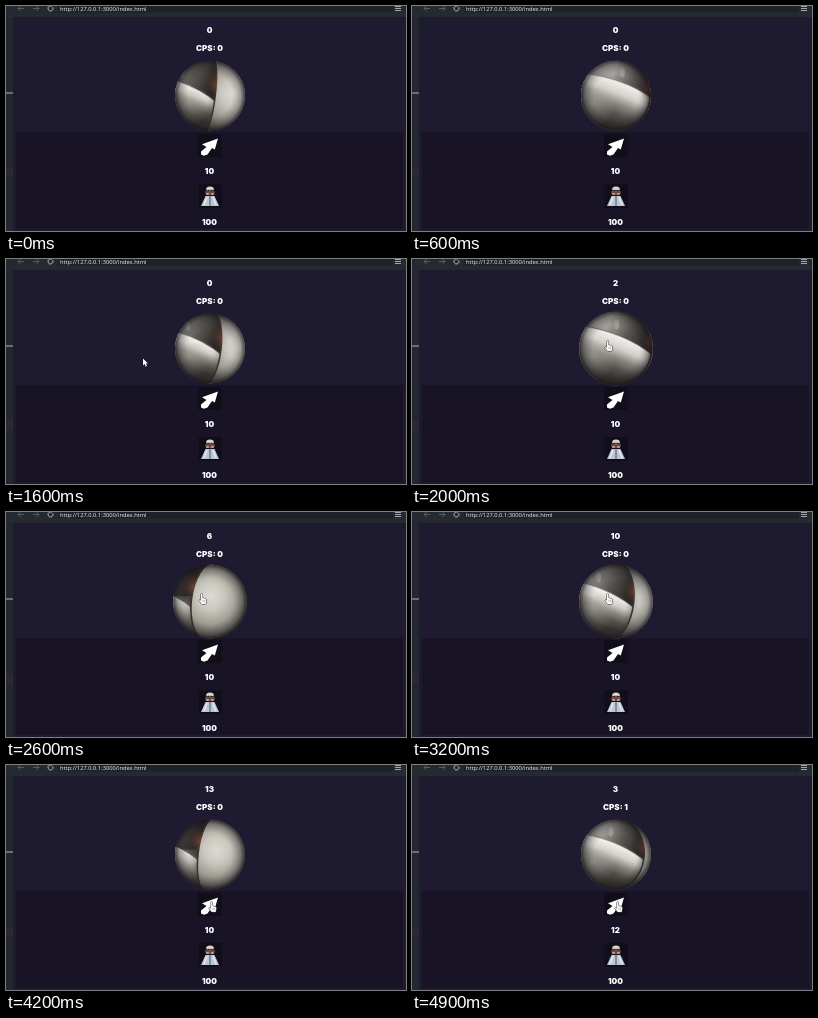
An HTML page with a canvas for the animation above (5 s loop, 400 by 225 pixels).

```html
<!DOCTYPE html>
<html lang="en">
<head>
<meta charset="utf-8">
<title>Clicker</title>
<style>
html, body { margin: 0; width: 100%; height: 100%; overflow: hidden; background: #1e1a2f; }
canvas { display: block; width: 400px; height: 225px; }
</style>
</head>
<body>
<canvas id="stage"></canvas>
<script>
const LOOP = 5000, STEP = 100, SPIN = 1500, R = 35;
const FIRST_CLICK = 1690, CLICK_GAP = 146, CLICKS = 13, PRICE = 10, BUY = 4500;
const path = [
  { t: 900, x: 313, y: 150 },
  { t: 1200, x: 79, y: 117 },
  { t: 1400, x: 79, y: 117 },
  { t: 1800, x: 195, y: 82 },
  { t: 3500, x: 195, y: 82 },
  { t: 3800, x: 205, y: 137 }
];

const canvas = document.getElementById('stage');
const ctx = canvas.getContext('2d');
const dpr = window.devicePixelRatio || 1;
canvas.width = 400 * dpr;
canvas.height = 225 * dpr;

const clamp = (v, lo, hi) => Math.max(lo, Math.min(hi, v));
const ramp = (t, from, to) => clamp((t - from) / (to - from), 0, 1);
const smooth = u => u * u * (3 - 2 * u);

function rect(x, y, w, h, color) {
  ctx.fillStyle = color;
  ctx.fillRect(x, y, w, h);
}

function trace(points) {
  ctx.beginPath();
  for (let i = 0; i < points.length; i += 2) ctx.lineTo(points[i], points[i + 1]);
}

function line(points, color, width = 0.8) {
  trace(points);
  ctx.strokeStyle = color;
  ctx.lineWidth = width;
  ctx.stroke();
}

function poly(points, fill, outline) {
  trace(points);
  ctx.closePath();
  if (outline) {
    ctx.strokeStyle = outline;
    ctx.lineWidth = 1;
    ctx.stroke();
  }
  ctx.fillStyle = fill;
  ctx.fill();
}

function oval(x, y, rx, ry, color) {
  ctx.beginPath();
  ctx.ellipse(x, y, rx, ry, 0, 0, 7);
  ctx.fillStyle = color;
  ctx.fill();
}

function label(text, y) {
  ctx.font = '900 8px Inter, sans-serif';
  ctx.textAlign = 'center';
  ctx.fillStyle = '#fff';
  ctx.fillText(text, 203.5, y);
}

function blend(gradient, ...colors) {
  colors.forEach((color, i) => gradient.addColorStop(i / (colors.length - 1), color));
  return gradient;
}

const linear = (x0, y0, x1, y1, ...colors) =>
  blend(ctx.createLinearGradient(x0, y0, x1, y1), ...colors);
const radial = (x, y, r0, r1, ...colors) =>
  blend(ctx.createRadialGradient(x, y, r0, x, y, r1), ...colors);

function glow(color, width, blur) {
  ctx.save();
  ctx.shadowColor = ctx.strokeStyle = color;
  ctx.shadowBlur = blur * dpr;
  ctx.lineWidth = width;
  ctx.stroke();
  ctx.restore();
}

// Bright crease running down to the seam, fading to shadow below
function drawFold(seam) {
  const depth = Math.max(22, 20 + seam * 0.45);
  const x0 = seam - 52, y0 = -19, y1 = 9;
  const edge = () => {
    ctx.beginPath();
    ctx.moveTo(x0 - 40, y0 - 4);
    ctx.quadraticCurveTo(x0 + 20, y0 - 2, seam + 2, y1);
  };
  edge();
  glow('rgba(30,27,25,.6)', 2, 4);
  edge();
  ctx.lineTo(seam + 2, 40);
  ctx.lineTo(-60, 40);
  const mx = seam - 24, my = -7;
  ctx.fillStyle = linear(mx, my, mx - depth * 0.4, my + depth,
    '#efeee9', '#d2d0c9', '#86837c', '#514e4a', '#393633');
  ctx.fill();
  rect(-R, -5, 45, 40, radial(-24, 8, 0, 24, 'rgba(190,188,180,.5)', 'rgba(190,188,180,0)'));
  edge();
  glow('rgba(240,239,234,.6)', 1.2, 3);
}

// Everything right of a meridian on the tilted sphere
function drawPanel(seam) {
  const s = clamp(seam, -R, R);
  const edge = () => {
    ctx.beginPath();
    ctx.ellipse(0, 0, Math.abs(s), R + 1, 0, -Math.PI / 2, Math.PI / 2, s < 0);
  };
  ctx.save();
  ctx.rotate(0.12);
  edge();
  glow('#393330', 3, 7);
  rect(s - 14, -26, 28, 28, radial(s, -12, 0, 13, 'rgba(112,70,54,.9)', 'rgba(80,50,40,0)'));
  edge();
  ctx.arc(0, 0, R + 1, Math.PI / 2, -Math.PI / 2, true);
  ctx.fillStyle = radial(s + 17, -5, 0, 52, '#dddcd4', '#c9c7be', '#a09d95', '#625f59', '#3a3734');
  ctx.fill();
  ctx.restore();
}

function drawBall(t, scale) {
  const seam = ((t / SPIN + 0.57) % 1 - 0.5) * 86;
  ctx.save();
  ctx.translate(204, 89.5);
  ctx.scale(scale, scale);
  ctx.beginPath();
  ctx.arc(0, 0, R, 0, 7);
  ctx.clip();
  rect(-R, -R, 70, 70, linear(seam - 42, -24, seam - 4, -10, '#a5a39d', '#5b5854', '#282523'));
  oval(seam - 34, -23, 2.5, 5, 'rgba(175,173,167,.6)');
  drawFold(seam);
  drawPanel(seam);
  rect(-R, -R, 70, 70, radial(0, 0, 22, R,
    'rgba(18,16,20,0)', 'rgba(18,16,20,.12)', 'rgba(18,16,20,.3)', 'rgba(18,16,20,.75)'));
  ctx.restore();
}

function drawWindow() {
  rect(0, 0, 400, 225, '#1e1a2f');
  rect(0, 0, 400, 11, '#252a30');
  rect(0, 11, 7, 214, '#222730');
  rect(0, 86.5, 7, 1, '#b4b7ba');
  rect(0, 162, 7, 9, '#2b2932');
  rect(10, 126, 387, 97, '#181425');
  rect(52, 0, 335, 6.5, '#1e2228');

  for (const [x, dir] of [[12, 1], [33, -1]]) {
    line([x, 2.5, x + 6 * dir, 2.5], '#626a72');
    line([x + 2.5 * dir, 0, x, 2.5, x + 2.5 * dir, 5], '#626a72');
  }
  ctx.beginPath();
  ctx.arc(44.5, 2.5, 2.5, -0.5, 5.2);
  ctx.strokeStyle = '#c3c7ca';
  ctx.lineWidth = 0.9;
  ctx.stroke();
  for (let i = 0; i < 3; i++) rect(389, 0.2 + i * 2, 6, 0.8, '#c3c7ca');

  ctx.font = '500 5.75px "Open Sans", sans-serif';
  ctx.textAlign = 'left';
  ctx.fillStyle = '#f0f1f2';
  ctx.fillText('http://127.0.0.1:3000/index.html', 54, 5);
}

function drawShop() {
  rect(192, 128, 23.5, 23, '#110e19');
  poly([212, 132.5, 208.8, 143.5, 206, 142, 201.5, 148.5, 198, 149.8, 195, 148.5,
    195, 145.5, 200.5, 141, 196, 138.3], '#fff');

  rect(192.5, 178, 23.5, 24, '#110e19');
  oval(204, 183, 3.8, 2.5, '#d8d5d0');
  oval(204, 186.5, 4.8, 2.8, '#6d4d43');
  for (const side of [-1, 1]) {
    oval(204 + side * 1.8, 184.5, 0.9, 0.8, '#251e20');
    oval(204 + side * 2.5, 188, 1.6, 1, '#c7a594');
  }
  poly([199.5, 190, 208.5, 190, 213, 200, 195, 200], '#bcc7d6');
  line([204, 190, 204, 200], '#4c5465', 1);
  for (const side of [-1, 1]) line([204 + side * 3, 191, 204 + side * 6, 199], '#e4e7ec', 1.5);
}

function drawPointer(t) {
  if (t < path[0].t) return;
  const next = path.findIndex(p => p.t > t);
  const b = path.at(next), a = next > 0 ? path[next - 1] : b;
  const u = a === b ? 0 : smooth(ramp(t, a.t, b.t));
  ctx.save();
  ctx.translate(a.x + (b.x - a.x) * u, a.y + (b.y - a.y) * u);
  if (t < 1800) {
    poly([0, 0, 0, 7, 1.6, 5.6, 2.8, 8.2, 4, 7.6, 2.8, 5.1, 5, 5], '#fff', '#15131b');
  } else {
    poly([0, 0, 1.4, 0, 1.6, 4, 4.8, 4.8, 5.4, 6, 4.7, 10, 0.6, 10,
      -2, 6.5, -1.5, 5.6, 0, 6.7], '#f4f4f4', '#3a373c');
    for (const x of [2.1, 3.5]) line([x, 6, x, 7.8], '#777', 0.4);
  }
  ctx.restore();
}

function render(now) {
  const t = Math.floor((now % LOOP) / STEP) * STEP;
  const bought = t >= BUY ? 1 : 0;
  const clicks = clamp(Math.floor((t - FIRST_CLICK) / CLICK_GAP), 0, CLICKS);
  const hover = ramp(t, 1700, 1900) - ramp(t, 3600, 3800);

  ctx.setTransform(dpr, 0, 0, dpr, 0, 0);
  drawWindow();
  drawBall(t, 1 + 0.055 * hover);
  drawShop();
  label(clicks - bought * PRICE, 26.8);
  label('CPS: ' + bought, 44.8);
  label(PRICE + 2 * bought, 167.9);
  label(100, 219.1);
  drawPointer(t);
}

let start;
function tick(now) {
  start ??= now;
  render(now - start);
  requestAnimationFrame(tick);
}
requestAnimationFrame(tick);
</script>
</body>
</html>
```
